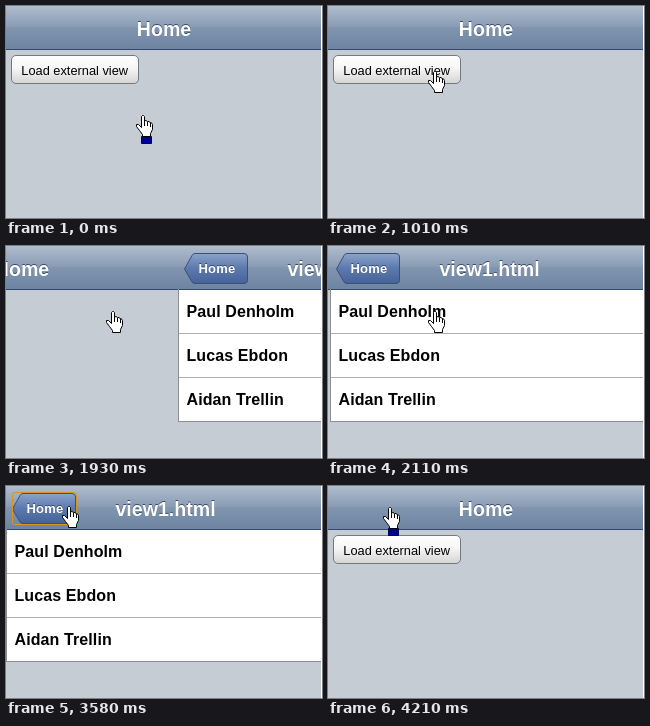
Write an HTML page that moves like this. It is 316 px wide and 212 px high and loops after 4.27 s.

```html
<!DOCTYPE html>
<html lang="en">
<head>
<meta charset="utf-8">
<title>External view</title>
<style>
html, body { margin: 0; width: 100%; height: 100%; overflow: hidden; background: #fff; }
svg { display: block; width: 316px; height: 212px; }
text { font-family: "Liberation Sans", Arial, sans-serif; white-space: pre; }
.title { font-size: 19.6px; font-weight: bold; text-anchor: middle; fill: #fff; }
.back { font-size: 13px; font-weight: bold; letter-spacing: .2px; fill: #fff; }
.shade { fill: #3d4c66; }
.row { font-size: 16px; font-weight: bold; letter-spacing: .1px; fill: #000; }
.label { font-size: 12.8px; fill: #000; }
.ink { fill: #fff; stroke: #000; stroke-width: 1; stroke-linejoin: round; }
</style>
</head>
<body>
<svg viewBox="0 0 316 212" xmlns="http://www.w3.org/2000/svg">
  <defs>
    <linearGradient id="bar" x2="0" y2="1">
      <stop offset="0" stop-color="#b0bccd"/><stop offset=".5" stop-color="#889bb3"/>
      <stop offset=".5" stop-color="#8195af"/><stop offset="1" stop-color="#6d84a2"/>
    </linearGradient>
    <linearGradient id="up" x2="0" y2="1">
      <stop offset="0" stop-color="#fff"/><stop offset=".45" stop-color="#f6f6f6"/><stop offset="1" stop-color="#d4d4d4"/>
    </linearGradient>
    <linearGradient id="down" x2="0" y2="1">
      <stop offset="0" stop-color="#e2e2e2"/><stop offset="1" stop-color="#bbb"/>
    </linearGradient>
    <linearGradient id="blue" x2="0" y2="1">
      <stop offset="0" stop-color="#8ba3c9"/><stop offset=".5" stop-color="#5b79ae"/><stop offset="1" stop-color="#456398"/>
    </linearGradient>
    <clipPath id="page"><rect width="315" height="212"/></clipPath>
  </defs>

  <g clip-path="url(#page)">
    <rect width="315" height="212" fill="#c6ccd4"/>
    <rect width="315" height="43" fill="url(#bar)"/>
    <rect y="43" width="315" height="1" fill="#33486f"/>

    <g id="home">
      <text class="title shade" x="158" y="29">Home</text>
      <text class="title" x="158" y="30">Home</text>
      <rect id="load" x="5.5" y="49.5" width="127" height="28" rx="4.5" stroke="#74797f"/>
      <text class="label" x="15.3" y="69">Load external view</text>
    </g>

    <g id="view">
      <text class="title shade" x="158.5" y="29">view1.html</text>
      <text class="title" x="158.5" y="30">view1.html</text>
      <path d="M5.5 23 L13 9.5 Q14 7.5 16 7.5 H65 Q68.5 7.5 68.5 11 V34.5 Q68.5 37.5 65 37.5 H16 Q14 37.5 13 36 Z" fill="url(#blue)" stroke="#3b5078"/>
      <text class="back shade" x="19.5" y="26">Home</text>
      <text class="back" x="19.5" y="27">Home</text>
      <rect id="ring" x="5.5" y="6.5" width="64" height="32" rx="2" fill="none" stroke="#d8961e"/>
      <g id="list"></g>
      <rect x="-.5" y="43.5" width="315" height="132" fill="none" stroke="#8c9096"/>
      <rect y="43" width="315" height="1" fill="#33486f"/>
    </g>
  </g>

  <g id="hand">
    <path id="sleeve" d="M5.5 21.5 H15.5 V28.5 H5.5 Z" fill="#000090" stroke="#000050"/>
    <path class="ink" d="M5.5 12.5 V1.5 L6.5 .5 H7.5 L8.5 1.5 V6 L10 5.5 L11.5 6.5 L13 6.5 L14.2 7.6 L15.3 7.6 L16.5 9.5 V14.5 L14.5 18.5 V21.5 H6.5 V19.5 L3.5 15.5 L.5 11.5 V9.5 H2.5 Z"/>
    <path d="M8.5 6 V11 M11.5 7 V11 M14.5 8 V12" stroke="#000" fill="none"/>
  </g>

  <g id="pen">
    <path d="M1 .5 H4 M6 .5 H8 M4.5 1 V14 M1 14.5 H4 M5 14.5 H8" stroke="#000" fill="none"/>
    <path d="M20 19 L26 14 L30 19 L23 25 Z" fill="#0000b0" stroke="#000" stroke-width=".6"/>
    <path class="ink" d="M5.5 9.5 L9 6.5 L14 5.5 L19 6.5 L24 9.5 L26.5 13.5 L20.5 19.5 L14 18.5 L9.5 16 L10.5 14 L7 12 Z"/>
    <path d="M11 10 L17 9 L20 11 L16 13.5 Z" fill="#e6d51c" stroke="#000" stroke-width=".7"/>
    <path d="M11 15 L16 15.5" stroke="#000" fill="none"/>
  </g>
</svg>
<script>
const LOOP = 4270, WIDTH = 315, STEP = 60;
const $ = id => document.getElementById(id);
const put = (el, x, y) => el.setAttribute("transform", `translate(${x} ${y})`);
const show = (el, on) => el.setAttribute("display", on ? "inline" : "none");
const clamp = v => Math.min(1, Math.max(0, v));
const smooth = v => v * v * (3 - 2 * v);
const mix = (a, b, k) => Math.round(a + (b - a) * k);
const snap = (t, from) => from + Math.floor((t - from) / STEP) * STEP;

$("list").innerHTML = ["Paul Denholm", "Lucas Ebdon", "Aidan Trellin"].map((name, i) => {
  const y = 44 + i * 44;
  return `<rect y="${y}" width="${WIDTH}" height="44" fill="#fff"/>` +
    `<rect y="${y + 43}" width="${WIDTH}" height="1" fill="#adb0b4"/>` +
    `<text class="row" x="7.5" y="${y + 27}">${name}</text>`;
}).join("");

// CSS "ease" curve, solved by bisection
function ease(x) {
  if (x <= 0 || x >= 1) return clamp(x);
  let lo = 0, hi = 1, s;
  for (let i = 0; i < 24; i++) {
    s = (lo + hi) / 2;
    if (.75 * s * (1 - s) + s ** 3 < x) lo = s; else hi = s;
  }
  return .3 * s * (1 - s) ** 2 + 3 * s * s * (1 - s) + s ** 3;
}

function slide(t) {
  if (t < 1870) return 0;
  if (t < 3520) return ease((snap(t, 1870) - 1849.2) / 300);
  return 1 - ease((snap(t, 3520) - 3578) / 272);
}

function pointer(t) {
  if (t < 460) return { x: 130, y: 109, kind: "sleeve" };
  if (t < 1010) {
    const k = smooth(clamp((snap(t, 460) - 400) / 480));
    const x = mix(130, 101, k), y = mix(109, 65, k);
    return { x, y, kind: y > 77 ? "sleeve" : "plain" };
  }
  if (t < 2900) return { x: 100, y: 65, kind: "plain" };
  if (t < 4210) {
    const k = smooth(clamp((snap(t, 2900) - 2900) / 360));
    const x = mix(100, 56, k), y = mix(65, 20, k);
    const kind = y > 56 ? "pen" : x < 65 && y < 39 ? "plain" : "sleeve";
    return { x, y, kind };
  }
  return { x: 55, y: 21, kind: "sleeve" };
}

function draw(t) {
  const shift = Math.round(slide(t) * WIDTH);
  put($("home"), -shift, 0);
  put($("view"), WIDTH - shift, 0);
  show($("view"), shift > 0);
  $("load").setAttribute("fill", t >= 1610 && t < 2200 ? "url(#down)" : "url(#up)");
  show($("ring"), t >= 3390);

  const { x, y, kind } = pointer(t);
  show($("pen"), kind === "pen");
  show($("hand"), kind !== "pen");
  show($("sleeve"), kind === "sleeve");
  put($("hand"), x, y);
  put($("pen"), x, y - 8);
}

const start = performance.now();
function tick() {
  draw((performance.now() - start) % LOOP);
  requestAnimationFrame(tick);
}
draw(0);
requestAnimationFrame(tick);
</script>
</body>
</html>
```
